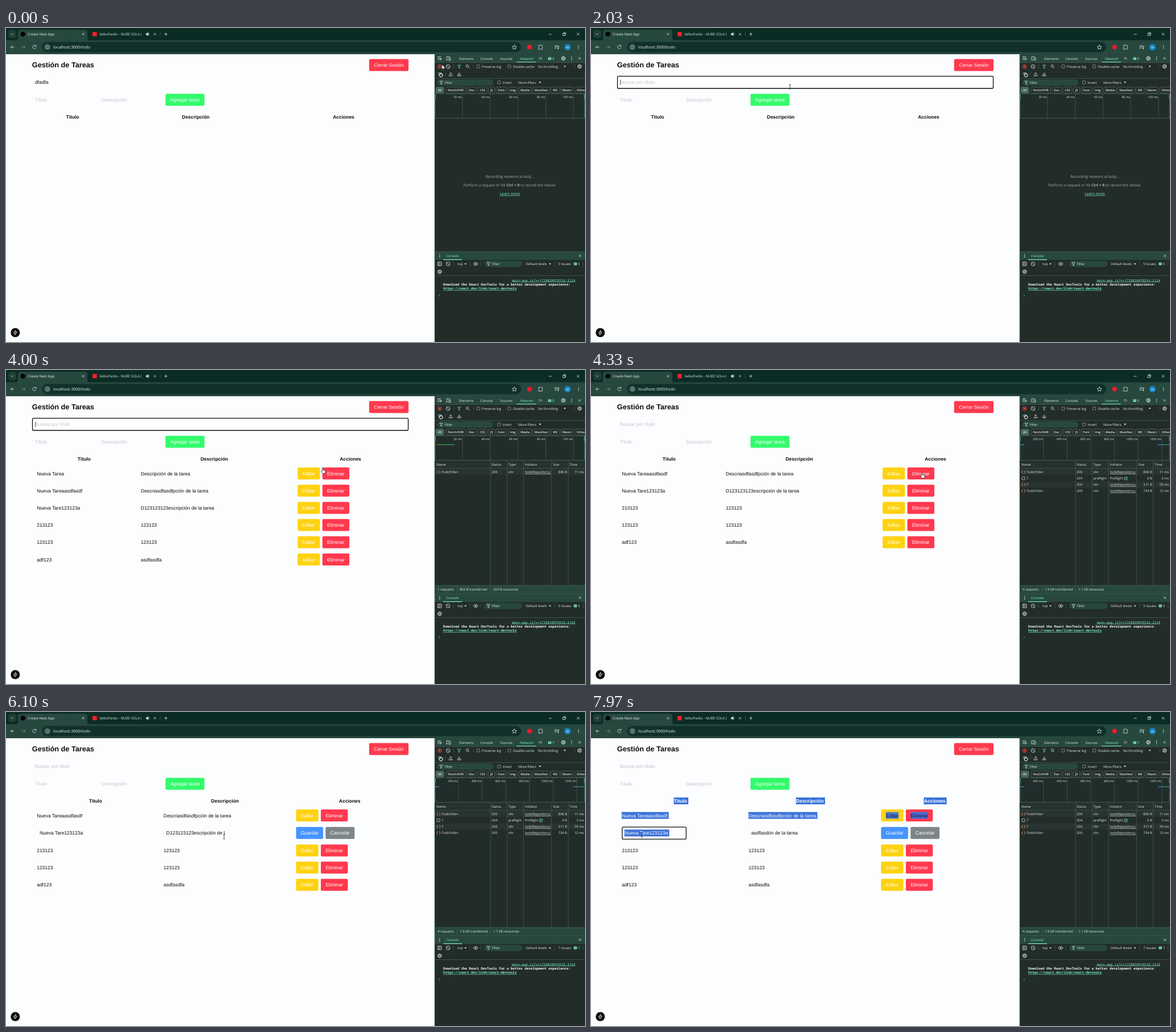
Write an HTML page that moves like this. It is 1017 px wide and 551 px high and loops after 8 s.

```html
<!DOCTYPE html>
<html lang="es">
<head>
<meta charset="utf-8">
<title>Gestión de Tareas</title>
<style>
html, body { margin: 0; width: 100%; height: 100%; overflow: hidden; background: #fcfdfe; }
svg { display: block; width: 1017px; height: 551px; }
text { white-space: pre; text-rendering: geometricPrecision; }
.page { font-family: "Liberation Sans", Arial, sans-serif; font-size: 8.47px; }
.ui { font-family: "Open Sans", "Noto Sans", sans-serif; font-size: 5.9px; }
.mono { font-family: "Noto Sans Mono", "DejaVu Sans Mono", monospace; font-size: 5.82px; }
</style>
</head>
<body>
<svg viewBox="0 0 1017 551"><g id="base"></g><g id="live"></g></svg>
<script>
const LOOP = 8000;
const INK = '#0c0c10', PALE = '#c3c3cc', LIGHT = '#e0e9e5', DIM = '#a7b0ac', MINT = '#7cf0cb';
const BAR = '#28483f', PANEL = '#222c29', EDGE = '#41665a', SELECT = '#3b72d9';
const RED = '#ff394e', GREEN = '#33fb6c', YELLOW = '#ffd211', BLUE = '#4694ff', GRAY = '#7d8588';

const pen = document.createElement('canvas').getContext('2d');
function widthOf(s, bold) {
  pen.font = (bold ? 'bold ' : '') + '84.7px "Liberation Sans", Arial, sans-serif';
  return pen.measureText(s).width / 10;
}

const rect = (x, y, w, h, fill, r = 0, more = '') =>
  `<rect x="${x}" y="${y}" width="${w}" height="${h}" fill="${fill}" rx="${r}" ${more}/>`;
const dot = (x, y, r, fill, more = '') => `<circle cx="${x}" cy="${y}" r="${r}" fill="${fill}" ${more}/>`;
const path = (d, stroke = LIGHT, w = .8, fill = 'none') =>
  `<path d="${d}" stroke="${stroke}" stroke-width="${w}" fill="${fill}"/>`;
const ring = (x, y, r, stroke = LIGHT, w = .8) => dot(x, y, r, 'none', `stroke="${stroke}" stroke-width="${w}"`);
const text = (cls, x, y, s, fill, more = '') => `<text class="${cls}" x="${x}" y="${y}" fill="${fill}" ${more}>${s}</text>`;
const ui = (x, y, s, fill = LIGHT, more = '') => text('ui', x, y, s, fill, more);
const page = (x, y, s, fill = INK, more = '') => text('page', x, y, s, fill, more);
const hline = (y, x = 753, x2 = 1017, c = EDGE) => path(`M${x} ${y}H${x2}`, c, .7);
const vline = (x, y, y2, c = EDGE) => path(`M${x} ${y}V${y2}`, c, .7);

// Small icons
const cross = (x, y, r = 2) => path(`M${x - r} ${y - r}l${2 * r} ${2 * r}m0 ${-2 * r}l${-2 * r} ${2 * r}`);
const kebab = (x, y) => [-2.4, 0, 2.4].map(d => dot(x, y + d, .75, LIGHT)).join('');
const gear = (x, y) => ring(x, y, 1.1) + ring(x, y, 2.8, LIGHT, 1) +
  dot(x, y, 3.5, 'none', `stroke="${LIGHT}" stroke-width=".9" stroke-dasharray="1.2 1.55"`);
const noEntry = (x, y) => ring(x, y, 3.4) + path(`M${x - 2.4} ${y - 2.4}l4.8 4.8`);
const funnel = (x, y, c = LIGHT) => path(`M${x - 2.7} ${y - 2.5}h5.4l-2 2.6v2.8h-1.4v-2.8z`, c, .7);
const check = (x, y) => rect(x - 2.6, y - 2.6, 5.2, 5.2, 'none', .8, `stroke="${DIM}" stroke-width=".7"`);
const drop = (x, y) => `<path d="M${x - 2} ${y - 1}h4l-2 2.6z" fill="${LIGHT}"/>`;
const badge = (x, y) => rect(x - 2.7, y - 2.4, 5.4, 4.6, MINT, .8) + path(`M${x - 1.5} ${y - .8}h3m-3 1.5h2`, PANEL, .6);
const arrowDown = (x, y, s) => path(`M${x} ${y - 3 * s}v${4.6 * s}m-2 ${-2 * s}l2 ${2 * s}l2 ${-2 * s}M${x - 2.8} ${y + 1}v2h5.6v-2`);
const pill = (x, y, w) => rect(x, y, w, 11, BAR, 5.5) + funnel(x + 7.5, y + 5.5) + ui(x + 13.5, y + 7.7, 'Filter');

function browserBar() {
  const [strip, bar, field] = ['#0b2c25', '#27483f', '#11302a'];
  return rect(0, 0, 1017, 22, strip) + rect(0, 21.5, 1017, 24.5, bar) +
    rect(4, 3.5, 14, 14, '#213f37', 4) + path('M8.8 9.6l2.2 2.2 2.2-2.2') +
    `<path d="M17 22q4 0 4-4V8q0-5 5-5H138q5 0 5 5v10q0 4 4 4z" fill="${bar}"/>` +
    dot(29.7, 10.8, 4.3, '#050505') +
    ui(38, 13, 'Create Next App', '#f0f6f3', 'style="font-size:6.2px"') + cross(135.5, 10.8, 1.9) +
    rect(152, 7, 7.5, 7.5, '#fb1f2e') +
    ui(164, 13, 'VelkoPardo - NUBE SOLA (', LIGHT, 'style="font-size:6.15px"') +
    rect(240.5, 4, 4, 14, strip, 0, 'opacity=".75"') +
    path('M246 9.7h1.5l2-1.8v5.8l-2-1.8h-1.5z', LIGHT, .5, LIGHT) + path('M250.7 8.7q1.7 2 0 4') +
    cross(261.5, 10.8, 1.9) + vline(271, 7, 15) + path('M278 10.8h5.6m-2.8-2.8v5.6') +
    path('M953.5 11h5') + path('M978 9.5h3.8v3.8h-3.8zM979.3 9.3v-1.2h3.8v3.8h-1.2') + cross(1005, 10.8, 2.2) +
    path('M14.5 33.5H8.5m2.8-2.8l-2.8 2.8 2.8 2.8') + path('M27.5 33.5h6m-2.8-2.8l2.8 2.8-2.8 2.8', '#7f9a90') +
    path('M52.2 31.6a3 3 0 1 0 .4 2.9M52.7 29.8v2.4h-2.4') +
    rect(63, 24.5, 842, 18, field, 9) + dot(72.7, 33.5, 6.5, '#25463d') + ring(72.7, 33.5, 3.2) + path('M72.7 33v2.2m0-3.7v.8') +
    ui(83, 36, 'localhost:3000/todo', '#eef5f2', 'style="font-size:7px"') +
    path('M893 29.6l1.1 2.7 2.9.2-2.2 1.9.7 2.8-2.5-1.5-2.5 1.5.7-2.8-2.2-1.9 2.9-.2z') +
    dot(919.5, 33.5, 4, '#f3192b') +
    path('M935.5 30.5h2.2q.8-2.4 1.8 0h2.4v2.3q2.2.9 0 1.8v2.5h-6.4v-2.2q2-1 0-2z') +
    path('M963.5 31h6m-6 2.2h6m-6 2.2h3M970.5 36v-4.5h1.5') + dot(969.6, 36, 1, LIGHT) +
    dot(986.3, 33.5, 5.6, '#1589c9') +
    ui(986.3, 35.5, 'm', '#fff', 'text-anchor="middle"') + kebab(1005.5, 33.5);
}

function devTools() {
  const chips = [['All', 755, 14], ['Fetch/XHR', 773, 34], ['Doc', 810, 16], ['CSS', 829, 16], ['JS', 847.5, 11],
    ['Font', 861, 18], ['Img', 882, 16], ['Media', 901, 22], ['Manifest', 925, 30], ['WS', 957, 15],
    ['Wasm', 974.5, 21], ['Other', 999, 22]];
  let s = rect(753, 46, 264, 505, PANEL) + rect(753, 46, 264, 14.5, BAR) +
    path('M764 50.5h-5v5h2M761.5 52.5l4 1.6-1.8.7-.7 1.7z') +
    path('M774 55.5v-5h6M773 55.8h4M778 52.5h3v4h-3z') +
    ui(796, 55.5, 'Elements') + ui(833, 55.5, 'Console') + ui(868, 55.5, 'Sources') + ui(903, 55.5, 'Network', MINT) +
    path('M936 51l2.2 2.2-2.2 2.2m3-4.4l2.2 2.2-2.2 2.2') + rect(897, 59.2, 34, 1.2, MINT) +
    badge(955, 53.8) + gear(979, 53.3) + kebab(993.5, 53.3) + cross(1007.5, 53.3) + hline(60.6) +
    ring(761.7, 67.7, 3.5, '#ef4b4b', .9) + rect(760.2, 66.2, 3, 3, '#f04444', .5) + noEntry(776.5, 67.7) +
    vline(786.5, 64, 71) + funnel(796, 67.6, MINT) + ring(810.2, 66.8, 2.2) + path('M811.8 68.4l2.4 2.4') + vline(821, 64, 71) +
    check(829.5, 67.5) + ui(836, 69.8, 'Preserve log') + check(884, 67.5) + ui(890.5, 69.8, 'Disable cache') +
    ui(934.5, 69.8, 'No throttling') + drop(981.5, 67.5) + vline(999, 64, 71) + gear(1007.5, 67.5) +
    path('M758.2 80.2q3.8-3.6 7.6 0m-6 1.8q2.2-2 4.2-.3') + gear(764, 82.8).replace('<circle', '<circle opacity="0"') +
    vline(772, 77, 85) + path('M781 83v-4.6m-2 2l2-2 2 2M778.2 82v2h5.6v-2') + arrowDown(796, 81, 1) + hline(88.5) +
    pill(757, 90.2, 99) + check(866, 95.5) + ui(872.3, 97.8, 'Invert') + ui(900, 97.8, 'More filters') + drop(938, 95.3);
  for (const [name, x, w] of chips) {
    s += rect(x, 103.7, w, 10.6, name == 'All' ? '#45675c' : 'none', 2, `stroke="#5f776e" stroke-width=".7"`) +
      ui(x + w / 2, 111.2, name, LIGHT, 'text-anchor="middle" font-weight="600" style="font-size:5.5px"');
  }
  return s + rect(753, 115.5, 264, 43, '#212d2a') + hline(115.5) + hline(158.3, 753, 1017, '#477a70') +
    rect(753, 392.5, 264, 14.5, BAR) + hline(392.5) + kebab(761.7, 399.7) + ui(773, 402, 'Console', MINT) +
    rect(768, 405.9, 33, 1.2, MINT) + cross(1008, 399.7) +
    path('M758.3 410.7h6.6v6.4h-6.6zm2.3 0v6.4m1.5-4.7l1.4 1.5-1.4 1.5') + noEntry(776.5, 414) + vline(786, 410, 418) +
    ui(793, 416.3, 'top') + drop(807, 414) + vline(815, 410, 418) +
    path('M820.7 414q4.3-5.4 8.8 0q-4.4 5.4-8.8 0z') + dot(825.1, 414, 1.3, LIGHT) + vline(834, 410, 418) +
    pill(840, 408.4, 67) + ui(913, 416.3, 'Default levels') + drop(955.5, 414) + vline(964, 410, 418) +
    badge(1000, 414) + vline(1013.5, 410, 418) + gear(761.7, 427.7) + hline(434.5) +
    text('mono', 1000, 444.5, 'main-app.js?v=1729834976516:2124', MINT, 'text-anchor="end" text-decoration="underline"') +
    text('mono', 768, 452, 'Download the React DevTools for a better development experience:', '#f3f7f5', 'font-weight="bold"') +
    text('mono', 768, 459.4, 'https://react.dev/link/react-devtools', MINT, 'font-weight="bold" text-decoration="underline"') +
    path('M759.7 467.3l2 2-2 2', '#56c9a8') + vline(753, 46, 551);
}

function button(x, y, w, label, fill, selected) {
  const lw = widthOf(label), tx = x + (w - lw) / 2;
  return rect(x, y - 10.5, w, 21, fill, 2.1) +
    (selected ? rect(tx, y - 6, lw, 12, SELECT, 0, 'opacity=".9"') : '') +
    page(tx, y + 3, label, selected ? '#101b4a' : '#fff');
}

function label(x, y, s, selected, bold) {
  const w = widthOf(s, bold);
  return (selected ? rect(x - .4, y - 6, w + 2.6, 12, SELECT) : '') +
    page(x, y + 3, s, selected ? '#fff' : INK, bold ? 'font-weight="bold"' : '');
}

const focusBox = (x, y, w, h) => rect(x, y, w, h, '#fff', 2, `stroke="${INK}" stroke-width="1.3"`);
const caret = (x, y) => rect(x, y - 4.8, .6, 9.6, INK);
const blinkOn = age => age % 1000 < 520;

function searchField(t) {
  const focused = t >= 1670 && t < 4130, filled = t < 2000, word = 'dfadfa';
  let s = focused ? focusBox(46.5, 84.6, 660, 21.4) : '';
  s += filled ? label(50.8, 95, word, t >= 1900) : page(50.8, 98, 'Buscar por título', PALE);
  if (focused && t < 1900) s += caret(50.8 + widthOf(word), 95);
  if (focused && !filled && blinkOn(t - 2000)) s += caret(51, 95.5);
  return s;
}

const OLD = 'D123123123escripción de la tarea', CUT = 18, TYPED = 'asdfasd';
function descriptionField(t, y, mouseX) {
  const x = 281.6, focused = t >= 6200 && t < 7500, typing = t >= 6670;
  const n = typing ? Math.min(7, Math.floor((t - 6670) / 62) + 1) : 0;
  const value = typing ? TYPED.slice(0, n) + OLD.slice(CUT) : OLD;
  let s = page(x, y + 3, value);
  if (focused && !typing) {
    let i = 0;
    while (i < CUT && x + widthOf(OLD.slice(0, i)) < mouseX - 2) i++;
    const part = OLD.slice(i, CUT), px = x + widthOf(OLD.slice(0, i));
    if (part) s += rect(px, y - 6, widthOf(part), 12, SELECT) + page(px, y + 3, part, '#fff');
  }
  if (focused && typing && blinkOn(t - 7104 + 1000)) s += caret(x + widthOf(TYPED.slice(0, n)), y);
  return (focused ? focusBox(277.2, y - 10.5, 112.3, 21.4) : '') + `<g clip-path="url(#field)">${s}</g>`;
}

const TASKS = [['Nueva Tarea', 'Descripción de la tarea'], ['Nueva Tareaasdfasdf', 'Descriasdfasdfpción de la tarea'],
  ['Nueva Tare123123a', OLD], ['213123', '123123'], ['123123', '123123'], ['adf123', 'asdfasdfa']];

function table(t, mouseX) {
  const editing = t >= 5400, picked = t >= 7600;
  const centers = t < 2960 ? [117, 333.3, 593] : editing ? [157.3, 384.6, 603.7] : [137.3, 366, 605];
  let s = ['Titulo', 'Descripción', 'Acciones'].map((h, i) =>
    label(centers[i] - widthOf(h, true) / 2, 156, h, picked, true)).join('');
  if (t < 2960) return s;
  const [col, act] = editing ? [276.8, 509.5] : [236.8, 512.2];
  TASKS.slice(t < 4230 ? 0 : 1).forEach(([name, info], i) => {
    const y = 181.5 + 30.2 * i + (editing && i ? i > 1 ? 1 : .6 : 0);
    if (editing && i == 1) {
      s += (t >= 7830 ? focusBox(54.8, y - 10.5, 112.3, 21.4) : '') + label(59, y, name, t >= 7900) +
        descriptionField(t, y, mouseX) +
        button(act, y, 47.6, 'Guardar', BLUE) + button(561.3, y, 50.9, 'Cancelar', GRAY);
      return;
    }
    const lit = picked && i == 0;
    s += label(54.2, y, name, lit) + label(col, y, info, lit) +
      button(act, y, 39.2, 'Editar', YELLOW, lit) + button(act + 43.5, y, 47.4, 'Eliminar', RED, lit);
  });
  return s;
}

function network(t) {
  const loaded = t >= 2960, later = t >= 4230;
  const pitch = later ? 41.65 : 48.75, step = later ? 200 : 20;
  let s = '';
  for (let i = 1; 753 + i * pitch < 1010; i++) {
    const x = 753 + i * pitch;
    s += vline(x, 116, 158, '#4a5c56') +
      ui(x - 1, 123, i * step + ' ms', LIGHT, 'text-anchor="end" style="font-size:5.2px"');
  }
  s += vline(753.7, 116, 158, '#5f9c8a') + vline(1016.3, 116, 158, '#5f9c8a') +
    rect(752.5, 116, 2.4, 9, '#4c8a79', 1) + rect(1015.3, 116, 2.4, 9, '#4c8a79', 1);
  if (!loaded) {
    const mid = 'text-anchor="middle" style="font-size:6.55px"';
    return s + ui(885, 263, 'Recording network activity…', DIM, mid) +
      ui(885, 278, `Perform a request or hit <tspan font-weight="bold">Ctrl + R</tspan> to record the reload.`, DIM, mid) +
      ui(885, 292.8, 'Learn more', MINT, mid + ' text-decoration="underline"');
  }
  const bars = later ? [[754, 7, '#4d90e8'], [996, 8, '#4d90e8'], [1004, 8, '#36b34a'], [1012, 4, '#4d90e8']]
    : [[756, 6, '#9a7a45'], [762, 21, '#36b34a'], [783, 5, '#4d90e8']];
  s += bars.map(([x, w, c]) => rect(x, 130.6, w, 1.1, c)).join('');
  const rows = [['Todo?title=', 200, 'xhr', '806 B', '11 ms'], ['7', 204, 'preflight', '0 B', '3 ms'],
    ['7', 200, 'xhr', '311 B', '59 ms'], ['Todo?title=', 200, 'xhr', '734 B', '12 ms']].slice(0, later ? 4 : 1);
  s += rect(753, 159, 264, 13.5, '#25322e');
  ['Name', 'Status', 'Type', 'Initiator', 'Size', 'Time'].forEach((h, i) =>
    s += ui([756, 853, 882.5, 911.5, 961, 990][i], 168, h));
  s += hline(172.6) + [851, 880.3, 909, 958.3, 987.5].map(x => vline(x, 159, 378)).join('');
  rows.forEach(([name, status, type, size, time], i) => {
    const y = 181.2 + 11.05 * i, pre = type == 'preflight', end = 'text-anchor="end"';
    if (i % 2 == 0) s += rect(753, y - 7.8, 264, 11, '#fff', 0, 'opacity=".03"');
    s += pre ? rect(757, y - 4.6, 5, 5, 'none', .5, `stroke="${LIGHT}" stroke-width=".7"`)
      : path(`M758.8 ${y - 4.8}q-1.2 0-1.2 1.4t-1.2 1.2q1.2 0 1.2 1.4t1.2 1.2m2-5.2q1.2 0 1.2 1.4t1.2 1.2q-1.2 0-1.2 1.4t-1.2 1.2`, '#f09a55');
    s += ui(765, y, name) + ui(853, y, status) + ui(882.5, y, type) +
      ui(911.5, y, pre ? 'Preflight' : 'todoRepository.j', LIGHT, pre ? '' : 'text-decoration="underline" clip-path="url(#col)"') +
      (pre ? ring(939.5, y - 2, 2.8, MINT) + path(`M938 ${y - .6}l3-2.8`, MINT) : '') +
      ui(985.5, y, size, LIGHT, end) + ui(1015, y, time, LIGHT, end);
  });
  const foot = later ? ['4 requests', '1.9 kB transferred', '1.1 kB resources'] : ['1 requests', '806 B transferred', '554 B resources'];
  s += rect(753, 378, 264, 14.2, BAR) + hline(378) + vline(792.5, 381.5, 389) + vline(851, 381.5, 389);
  return s + foot.map((f, i) => ui([758, 797, 856][i], 387.3, f)).join('');
}

const ROUTE = [[0, 765.5, 64], [30, 765.5, 64], [1160, 478, 96], [1500, 349.5, 103], [3500, 349.5, 103], [4130, 581.5, 180],
  [4730, 581.5, 180], [5350, 531, 212], [5540, 531, 212], [6100, 383, 219], [6200, 361, 217], [6400, 239.5, 212],
  [7500, 239.5, 212], [7830, 89, 216], [LOOP, 89, 216]];
function mouseAt(t) {
  const i = ROUTE.findIndex(k => k[0] > t), [t0, x0, y0] = ROUTE[i - 1], [t1, x1, y1] = ROUTE[i];
  const u = (t - t0) / (t1 - t0), e = u * u * (3 - 2 * u);
  return [x0 + (x1 - x0) * e, y0 + (y1 - y0) * e];
}

function pointer(t, x, y) {
  const within = (a, b, c, d) => x > a && x < c && y > b && y < d;
  const edit = t >= 5400, row = edit && y > 201 && y < 224;
  const overText = within(46, 84, 707, 106) || row && (x > 54 && x < 168 || x > 277 && x < 390);
  const overButton = t >= 2960 && within(509, 171, 603, 344) && (y - 171) % 30.2 < 21 || within(280, 115, 348, 137);
  const shape = overText ? path('M-1.7-4.2q1.7 0 1.7 1v6.4q0 1-1.7 1M1.7-4.2q-1.7 0-1.7 1m0 6.4q0 1 1.7 1', '#222', .8)
    : overButton ? path('M-.9.2q.9-1 1.7 0v3.6l3.2.9q1 .4.8 1.6l-.7 3.6h-4.3l-2.5-3.7q.3-1.3 1.8-.2z', '#111', .7, '#fff')
    : path('M0 0v8.6l2-1.8 1.4 3.1 1.3-.6-1.4-3h2.9z', '#111', .7, '#fff');
  return `<g transform="translate(${x.toFixed(2)} ${y.toFixed(2)})">${shape}</g>`;
}

function scene(t) {
  const [x, y] = mouseAt(t), issues = t < 5480 ? 5 : 7;
  return searchField(t) + table(t, x) + network(t) + ui(959.5, 56, issues) +
    ui(970, 416.3, issues + ' Issues:') + ui(1004.7, 416.3, issues) + pointer(t, x, y);
}

const base = document.getElementById('base'), live = document.getElementById('live');
base.innerHTML = `<clipPath id="field"><rect x="280" y="200" width="105" height="26"/></clipPath>
  <clipPath id="col"><rect x="909" y="159" width="49" height="219"/></clipPath>` +
  rect(0, 0, 1017, 551, '#fcfdfe') + browserBar() + devTools() +
  page(45.8, 69.3, 'Gestión de Tareas', INK, 'font-weight="bold" style="font-size:12.7px"') +
  button(637.8, 65, 69.2, 'Cerrar Sesión', RED) + button(280.2, 126, 68.4, 'Agregar tarea', GREEN) +
  page(50.8, 129, 'Título', PALE) + page(167.6, 129, 'Descripción', PALE) +
  dot(16.3, 534.5, 8, '#0d0d0f') + path('M17.2 530.5l-4 4.8h2.8l-.6 3.4 4-4.9h-2.8z', '#fff', .8);

let shown = '';
function frame() {
  const markup = scene(performance.now() % LOOP);
  if (markup !== shown) live.innerHTML = shown = markup;
  requestAnimationFrame(frame);
}
frame();
</script>
</body>
</html>
```
